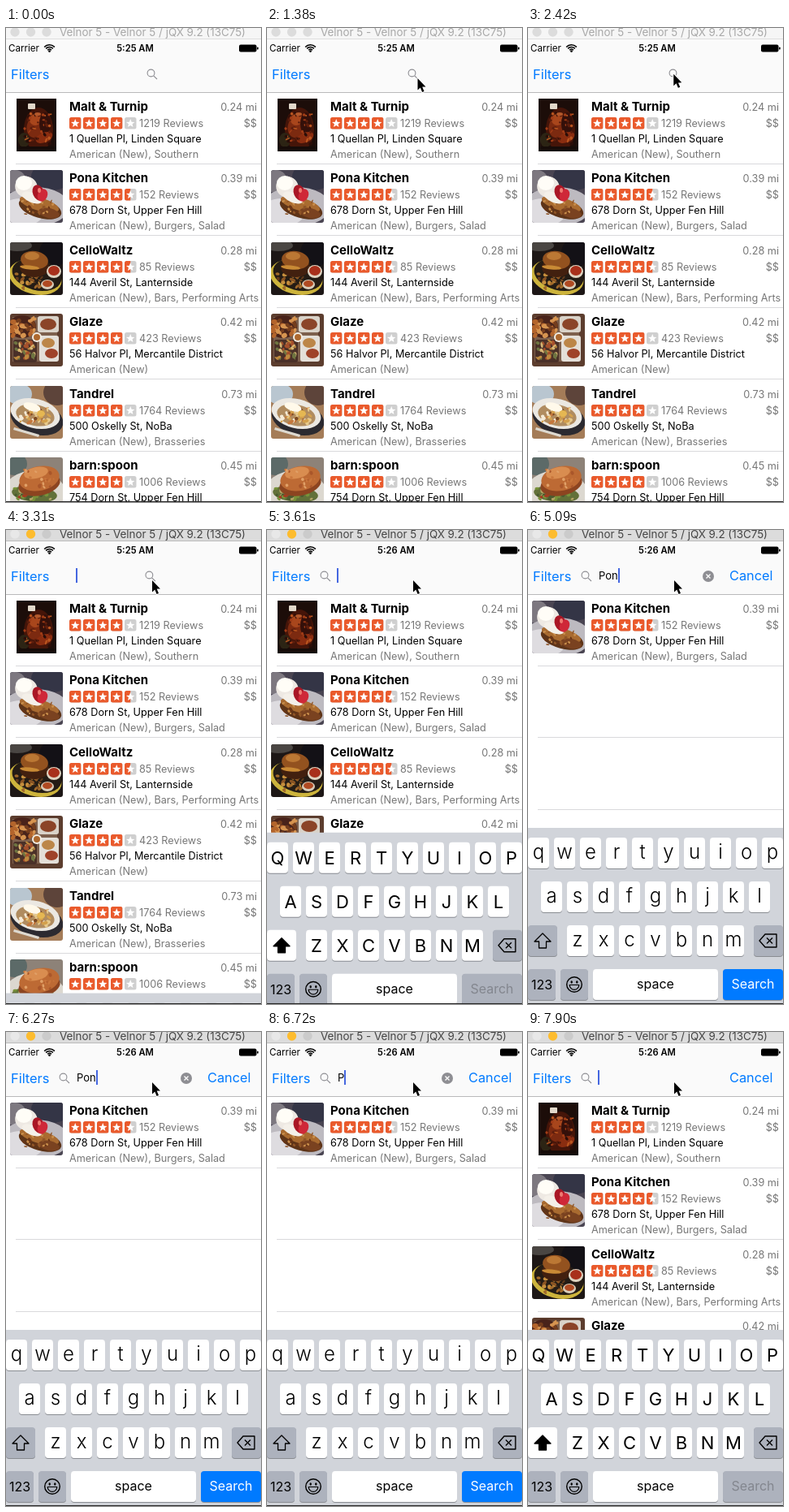
Animation of 314 by 584 pixels, one loop 8000 ms. Source, as an HTML page with a canvas:

```html
<!DOCTYPE html>
<html lang="en">
<head>
<meta charset="utf-8">
<title>Restaurant search</title>
<style>
html, body { margin: 0; width: 100%; height: 100%; overflow: hidden; background: #fff; }
canvas { display: block; width: 314px; height: 584px; }
</style>
</head>
<body>
<canvas id="stage"></canvas>
<script>
const W = 314, H = 584, LOOP = 8000;
const BLUE = '#007aff', GRAY = '#777', SPECIAL = '#adb2bd';
const canvas = document.getElementById('stage');
const dpr = window.devicePixelRatio || 1;
canvas.width = W * dpr;
canvas.height = H * dpr;
const g = canvas.getContext('2d');
g.scale(dpr, dpr);

const clamp = v => Math.max(0, Math.min(1, v));
const smooth = v => v * v * (3 - 2 * v);

function rect(x, y, w, h, color) {
  g.fillStyle = color;
  g.fillRect(x, y, w, h);
}
function round(x, y, w, h, r, color) {
  g.fillStyle = color;
  g.beginPath();
  g.roundRect(x, y, w, h, r);
  g.fill();
}
function blob(color, x, y, rx, ry = rx, turn = 0) {
  g.fillStyle = color;
  g.beginPath();
  g.ellipse(x, y, rx, ry, turn, 0, 7);
  g.fill();
}
function text(str, x, y, size, color, align = 'left', weight = 400) {
  g.font = `${weight} ${size}px Inter, sans-serif`;
  g.textAlign = align;
  g.fillStyle = color;
  g.fillText(str, x, y);
}
function poly(points) {
  g.beginPath();
  points.forEach(([x, y]) => g.lineTo(x, y));
  g.closePath();
}
function stroke(color, width) {
  g.strokeStyle = color;
  g.lineWidth = width;
  g.stroke();
}

// Small seeded flecks that give the pictures some grain.
function flecks(seed, count, colors, x, y, w, h, size) {
  const rnd = () => (seed = (seed * 16807) % 2147483647) / 2147483647;
  for (let i = 0; i < count; i++) {
    blob(colors[i % colors.length], x + rnd() * w, y + rnd() * h,
      size * (0.4 + rnd()), size * (0.3 + rnd() * 0.6), rnd() * 3);
  }
}

const pictures = [
  () => {
    g.save();
    g.beginPath();
    g.rect(8, 0, 49, 65);
    g.clip();
    rect(8, 0, 49, 65, '#1c0d09');
    blob('#451509', 35, 38, 18, 27);
    blob('#7c2a10', 33, 34, 12, 15, 0.4);
    blob('#a8461c', 31, 26, 7, 7);
    blob('#34100a', 43, 31, 7, 14);
    blob('#8a2d10', 42, 48, 11, 6, -0.4);
    blob('#2c2414', 17, 51, 7, 9);
    flecks(19, 40, ['#a13c16', '#2a0d08', '#5d1d0c', '#b9551f'], 18, 18, 32, 38, 2.2);
    rect(8, 59, 49, 6, '#160c09');
    round(22, 6, 9, 7, 1, '#e2d8ca');
    blob('#b2582b', 34, 19, 4, 2);
    g.restore();
  },
  () => {
    rect(0, 0, 65, 65, '#4a4552');
    blob('#343546', 51, 8, 25, 17);
    blob('#7d7880', 6, 14, 14, 14);
    blob('#bdbac0', 31, 45, 42, 24);
    blob('#dedce0', 14, 52, 28, 17);
    blob('#5e3418', 37, 47, 27, 12, 0.28);
    blob('#a96b30', 36, 42, 25, 8, 0.28);
    blob('#7a4220', 48, 53, 13, 6, 0.2);
    flecks(31, 26, ['#6b3515', '#c98e4b', '#8f5426'], 15, 37, 40, 18, 2.2);
    blob('#eee9e3', 20, 21, 14, 13, 0.4);
    blob('#fffdf7', 17, 16, 10, 9);
    blob('#f4f0e9', 27, 34, 13, 6, 0.4);
    blob('#a91625', 35, 28, 7, 10, -0.4);
    blob('#cf2838', 40, 31, 6, 8, 0.4);
    blob('#ef7a72', 36, 25, 2, 3);
  },
  () => {
    rect(0, 0, 65, 65, '#1d1716');
    blob('#4a4643', 9, 4, 18, 7);
    blob('#131116', 53, 13, 17, 18);
    blob('#cdb43c', 31, 43, 33, 21, 0.25);
    blob('#241c15', 33, 40, 31, 19, 0.25);
    flecks(47, 30, ['#a0692a', '#c58e3d', '#633a1b', '#8a5423'], 8, 35, 32, 22, 2.8);
    blob('#42200f', 30, 31, 18, 12);
    blob('#93521f', 30, 22, 17, 11, 0.15);
    blob('#bb7834', 27, 17, 9, 5);
    blob('#c98a35', 24, 31, 12, 2.5, 0.1);
    blob('#dfd3c0', 54, 36, 9, 8);
    blob('#a8301b', 54, 35, 7, 6);
    blob('#d8ccb8', 46, 52, 8, 6);
    blob('#b04a22', 46, 51, 6, 4);
  },
  () => {
    rect(0, 0, 65, 65, '#5c3d2e');
    rect(3, 4, 55, 55, '#7d604d');
    blob('#49231a', 15, 16, 17, 14);
    flecks(13, 30, ['#b4652c', '#743d1d', '#d69450'], 3, 5, 26, 22, 3.6);
    round(34, 3, 26, 20, 3, '#d9d2c8');
    blob('#8b4428', 47, 13, 10, 7);
    round(4, 32, 29, 28, 3, '#4a3028');
    flecks(83, 30, ['#bd8a3f', '#6e7441', '#a5502b', '#d8b774'], 7, 34, 23, 23, 2.8);
    round(36, 27, 24, 32, 3, '#e4dfd8');
    blob('#bc8648', 47, 36, 8, 6);
    blob('#9f4329', 51, 49, 8, 6);
    blob('#f4eee3', 33, 29, 6);
    blob('#ad682e', 33, 29, 4);
  },
  () => {
    rect(0, 0, 65, 65, '#a47c58');
    blob('#5d443a', 58, 8, 17, 16);
    blob('#b9c6d0', 11, 10, 16, 13);
    blob('#2c2a30', 33, 40, 33, 20, 0.25);
    blob('#ebe8e2', 31, 34, 31, 18, 0.25);
    blob('#b08c60', 31, 36, 24, 13, 0.2);
    flecks(7, 42, ['#d3a04d', '#f4ead7', '#7b4a25', '#c4783d', '#e6c98c'], 13, 25, 36, 20, 3);
    blob('#fff9ea', 27, 26, 11, 5, 0.3);
    blob('#e5b752', 38, 34, 5, 4);
    poly([[5, 51], [36, 60], [35, 63], [4, 54]]);
    g.fillStyle = '#ddd9d0';
    g.fill();
  },
  () => {
    rect(0, 0, 65, 65, '#8d8278');
    blob('#5c6a68', 5, 8, 16, 14);
    blob('#dcd8d0', 30, 44, 38, 28);
    blob('#627139', 30, 45, 28, 10, 0.1);
    flecks(61, 28, ['#78923a', '#b3a365', '#a23c21', '#4b5b30'], 6, 38, 50, 14, 3);
    blob('#8c4420', 36, 33, 26, 14, -0.2);
    blob('#bd6a34', 36, 26, 25, 15, -0.2);
    blob('#d98d50', 32, 19, 15, 7, -0.2);
    flecks(23, 18, ['#c9763c', '#e0a067', '#a9562a'], 18, 15, 38, 22, 2.4);
  }
];

const places = [
  ['Malt & Turnip', '1 Quellan Pl, Linden Square', 'American (New), Southern', '0.24 mi', 1219, 4],
  ['Pona Kitchen', '678 Dorn St, Upper Fen Hill', 'American (New), Burgers, Salad', '0.39 mi', 152, 4.5],
  ['CelloWaltz', '144 Averil St, Lanternside', 'American (New), Bars, Performing Arts', '0.28 mi', 85, 4.5],
  ['Glaze', '56 Halvor Pl, Mercantile District', 'American (New)', '0.42 mi', 423, 4],
  ['Tandrel', '500 Oskelly St, NoBa', 'American (New), Brasseries', '0.73 mi', 1764, 4],
  ['barn:spoon', '754 Dorn St, Upper Fen Hill', 'American (New), Burgers', '0.45 mi', 1006, 4]
];

function ratingBox(x, y, fill) {
  round(x, y, 14.5, 14.5, 2.5, '#cfcfcf');
  if (fill) {
    g.save();
    g.beginPath();
    g.rect(x, y, 14.5 * fill, 15);
    g.clip();
    round(x, y, 14.5, 14.5, 2.5, '#ea5a2c');
    g.restore();
  }
  const points = [];
  for (let i = 0; i < 10; i++) {
    const a = i * Math.PI / 5 - Math.PI / 2, r = i % 2 ? 2.4 : 5.5;
    points.push([x + 7.25 + r * Math.cos(a), y + 7.6 + r * Math.sin(a)]);
  }
  poly(points);
  g.fillStyle = '#fff';
  g.fill();
}

function row(id, slot) {
  const [name, address, food, miles, reviews, stars] = places[id];
  const y = Math.round(80 + slot * 88.4);
  g.save();
  g.translate(5, y + 7);
  g.beginPath();
  g.roundRect(0, 0, 65, 65, 3);
  g.clip();
  pictures[id]();
  g.restore();
  text(name, 78, y + 22, 15, '#000', 'left', 700);
  text(miles, 309, y + 22, 12.7, GRAY, 'right');
  for (let i = 0; i < 5; i++) ratingBox(78 + i * 17, y + 30, clamp(stars - i));
  text(reviews + ' Reviews', 164, y + 42, 12.7, GRAY);
  text('$$', 309, y + 42, 12.7, GRAY, 'right');
  text(address, 78, y + 61, 12.7, '#000');
  text(food, 78, y + 79.5, 12.7, GRAY);
}

function list(ids) {
  rect(0, 80, W, H - 80, '#fff');
  for (let i = 1; i < 6; i++) rect(12, Math.floor(79 + i * 88.4), W - 12, 1, '#d9d9dc');
  ids.forEach(row);
}

function titleBar(active) {
  rect(0, 0, W, 14, active ? '#dcdcdc' : '#f6f6f6');
  rect(0, 13, W, 1, active ? '#bcbcbc' : '#dedede');
  const lights = active ? ['#e8e8e8', '#fdbc2e', '#cbcbcb'] : ['#dcdcdc', '#dcdcdc', '#dcdcdc'];
  lights.forEach((c, i) => blob(c, 11 + i * 19.5, 5, 5.7));
  text('Velnor 5 - Velnor 5 / jQX 9.2 (13C75)', 66, 9.5, 13.4, active ? '#444' : '#a8a8a8');
}

function glass(x) {
  g.beginPath();
  g.arc(x - 1.5, 55.5, 4.4, 0, 7);
  g.moveTo(x + 1.7, 58.8);
  g.lineTo(x + 6, 63);
  stroke('#8e8e93', 1.1);
}

function navBar(s) {
  rect(0, 14, W, 65, '#fafafa');
  rect(0, 79, W, 1, '#b9b9bb');
  text('Carrier', 3, 29, 11.6, '#000');
  for (const r of [3.3, 6, 8.7]) {
    g.beginPath();
    g.arc(53.5, 29.5, r, -Math.PI * 0.76, -Math.PI * 0.24);
    stroke('#000', 1.6);
  }
  blob('#000', 53.5, 28.6, 1.4);
  text(s.clock, 159, 29, 11.2, '#000', 'center', 600);
  round(287, 20.5, 21.5, 9, 2, '#000');
  round(309, 23.5, 1.7, 3, 1, '#000');

  text('Filters', 6, 63, 16.4, BLUE);
  glass(s.glassX);
  text(s.query, 87, 61, 13, '#000');
  const caretX = s.query ? 87 + g.measureText(s.query).width : 86;
  g.globalAlpha = s.caret;
  rect(Math.round(caretX), 47, 2, 18, '#4567e0');
  g.globalAlpha = 1;
  if (s.query) {
    blob('#8e8e93', 222, 57, 7);
    g.beginPath();
    g.moveTo(219.5, 54.5);
    g.lineTo(224.5, 59.5);
    g.moveTo(224.5, 54.5);
    g.lineTo(219.5, 59.5);
    stroke('#fff', 1.3);
  }
  if (s.cancel) text('Cancel', 248, 62, 16.3, BLUE);
}

function key(x, y, w, color = '#fff') {
  round(x, y + 1, w, 38, 4, '#898c92');
  round(x, y, w, 38, 4, color);
}

function keyboard(top, lower) {
  g.save();
  g.translate(0, top);
  rect(0, 0, W, 220, '#d1d4da');
  [['QWERTYUIOP', 0], ['ASDFGHJKL', 16], ['ZXCVBNM', 48]].forEach(([letters, left], r) => {
    [...letters].forEach((c, i) => {
      const x = left + i * 32, y = 12 + r * 54;
      key(x, y, 26);
      text(lower ? c.toLowerCase() : c, x + 13, y + (lower ? 26 : 27),
        lower ? 24 : 22, '#000', 'center', lower ? 300 : 400);
    });
  });

  key(0, 120, 36, lower ? SPECIAL : '#fff');
  poly([[18, 130], [28, 140], [22.5, 140], [22.5, 148], [13.5, 148], [13.5, 140], [8, 140]]);
  g.lineJoin = 'round';
  if (!lower) {
    g.fillStyle = '#000';
    g.fill();
  }
  stroke('#000', 1.3);

  key(278, 120, 36, SPECIAL);
  poly([[285, 139], [292, 131], [306, 131], [306, 147], [292, 147]]);
  stroke('#000', 1.4);
  g.beginPath();
  g.moveTo(294, 135.5);
  g.lineTo(301, 142.5);
  g.moveTo(301, 135.5);
  g.lineTo(294, 142.5);
  stroke('#000', 1.4);

  key(0, 174, 34, SPECIAL);
  text('123', 17, 199, 16, '#000', 'center');
  key(40, 174, 34, SPECIAL);
  g.beginPath();
  g.arc(57, 193, 9.3, 0, 7);
  stroke('#000', 1.4);
  blob('#000', 53.7, 190, 1.2, 1.8);
  blob('#000', 60.3, 190, 1.2, 1.8);
  g.beginPath();
  g.arc(57, 193.5, 5.8, 0, Math.PI);
  g.closePath();
  stroke('#000', 1.2);
  key(80, 174, 154);
  text('space', 157, 198, 16, '#000', 'center');
  key(240, 174, 74, lower ? BLUE : SPECIAL);
  text('Search', 277, 198, 16, lower ? '#fff' : '#83868e', 'center');
  g.restore();
}

function pointer(x, y) {
  g.save();
  g.translate(x, y);
  poly([[0, 0], [0, 14.5], [3.3, 11.5], [5.6, 17], [8, 16], [5.7, 10.6], [10, 10.4]]);
  g.lineJoin = 'round';
  stroke('#fff', 2);
  g.fillStyle = '#000';
  g.fill();
  g.restore();
}

// The screen refreshes in ticks of 148 ms; all poses follow the tick.
const tickAt = ms => Math.floor((ms - 490) / 148);

function pointerAt(k) {
  if (k < 0) return null;
  if (k <= 6) {
    const p = 1 - (1 - k / 6) ** 2;
    return [300 - 114.5 * p, 297 - 235 * p];
  }
  const path = [[7, 184, 57], [9, 181, 51], [12, 179, 55], [15, 180, 62]];
  if (k >= 15) return path[3].slice(1);
  const i = path.findIndex(p => p[0] > k) - 1;
  const [k0, x0, y0] = path[i], [k1, x1, y1] = path[i + 1];
  const p = smooth((k - k0) / (k1 - k0));
  return [x0 + (x1 - x0) * p, y0 + (y1 - y0) * p];
}

function queryAt(k) {
  const steps = [[30, 2], [31, 3], [32, 4], [39, 3], [41, 2], [42, 1], [43, 0]];
  let n = 0;
  for (const [from, length] of steps) if (k >= from) n = length;
  return 'Pona'.slice(0, n);
}

function caretAt(k) {
  if (k < 19) return 0;
  for (const [fade, back] of [[25, 28], [36, 39], [47, 50]]) {
    if (k === fade) return 0.45;
    if (k > fade && k < back) return 0;
  }
  return 1;
}

function keyboardTop(k) {
  const wt = 0.4 + 2.55 * (k - 19);
  return 584 - 217 * (1 - (1 + wt) * Math.exp(-wt));
}

function draw(ms) {
  const k = tickAt(ms);
  const query = queryAt(k);
  const slide = smooth(clamp((0.148 * (k - 19) + 0.025) / 0.3));
  list(query ? [1] : [0, 1, 2, 3, 4, 5]);
  if (k >= 19) keyboard(keyboardTop(k), k >= 29 && k < 43);
  navBar({
    clock: k < 20 ? '5:25 AM' : '5:26 AM',
    glassX: 180 - 108 * (k < 19 ? 0 : slide),
    query,
    caret: caretAt(k),
    cancel: k >= 30
  });
  titleBar(k >= 19);
  rect(0, 583, W, 1, '#2a2a2a');
  const at = pointerAt(k);
  if (at) pointer(...at);
}

const start = performance.now();
function loop() {
  draw((performance.now() - start) % LOOP);
  requestAnimationFrame(loop);
}
loop();
</script>
</body>
</html>
```
